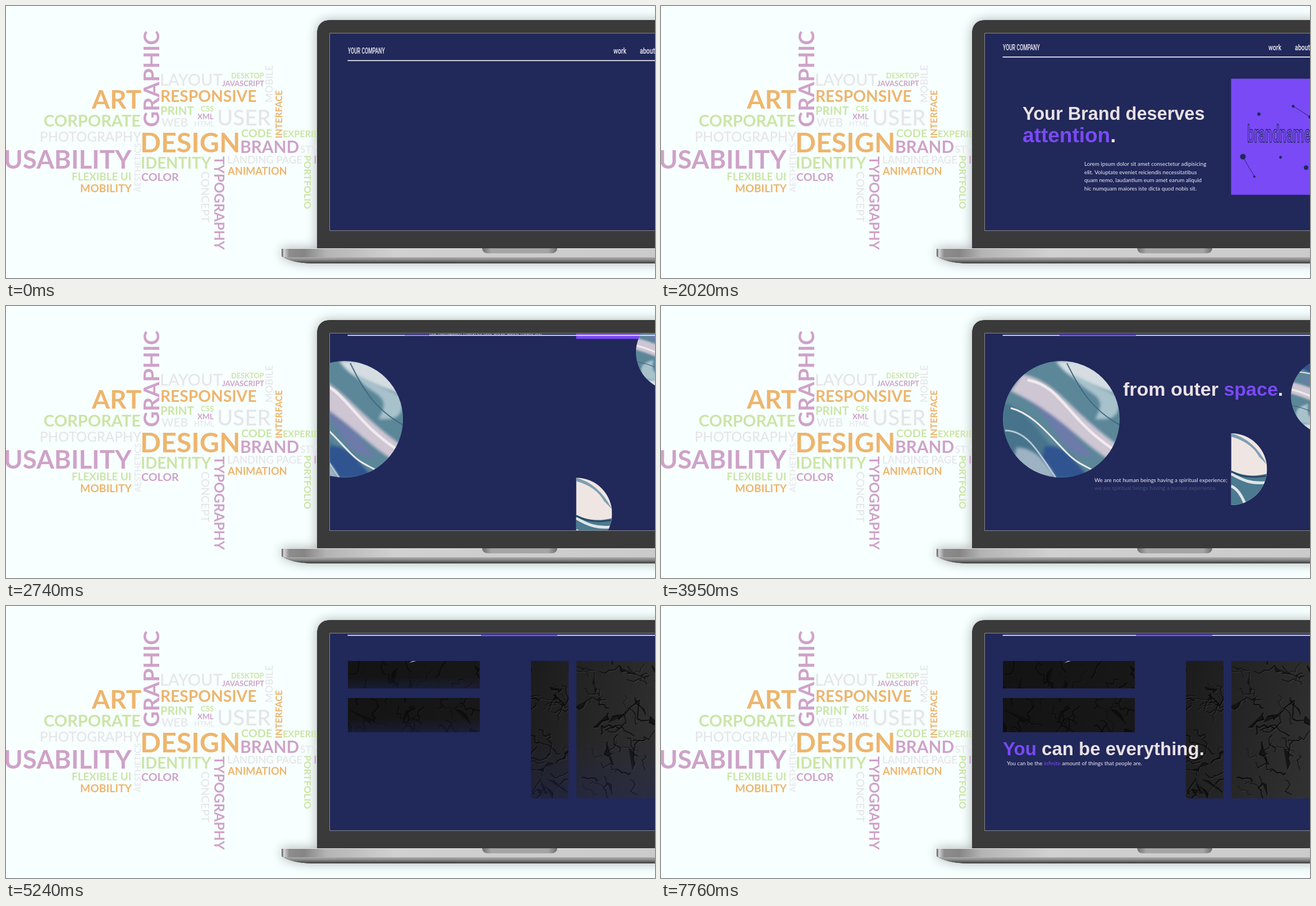
Recreate the animation shown at these times as an HTML page with a canvas. Size 1156 px wide and 485 px high, loop 8000 ms.

```html
<!DOCTYPE html>
<html lang="en">
<head>
<meta charset="utf-8">
<title>Design word cloud and laptop</title>
<style>
  html, body { margin: 0; width: 100%; height: 100%; overflow: hidden; background: #f8ffff; }
  canvas { display: block; }
</style>
</head>
<body>
<canvas id="stage" width="1156" height="485"></canvas>
<script>
const NAVY = "#21285a", VIOLET = "#7a4af6", PALE = "#e9e1e5";
const HEAD = "bold 34px 'Liberation Sans', Arial, sans-serif";
const COPY = "9.8px Lato, sans-serif";
const NAV = "500 15px Roboto, sans-serif";
const stage = document.getElementById("stage").getContext("2d");

// builds a picture once, for reuse in every frame
function picture(width, height, paint) {
  const canvas = document.createElement("canvas");
  canvas.width = width;
  canvas.height = height;
  paint(canvas.getContext("2d"));
  return canvas;
}

function layer(c, { alpha = 1, x = 0, y = 0, sx = 1, sy = 1, turn = 0, clip }, paint) {
  if (alpha <= 0) return;
  c.save();
  c.globalAlpha *= alpha;
  c.translate(x, y);
  c.rotate(turn * Math.PI / 180);
  c.scale(sx, sy);
  if (clip) c.clip(new Path2D(clip));
  paint();
  c.restore();
}

function fill(c, d, style) {
  c.fillStyle = style;
  c.fill(new Path2D(d));
}

function stroke(c, d, style, width = 1) {
  c.strokeStyle = style;
  c.lineWidth = width;
  c.stroke(new Path2D(d));
}

function box(c, x, y, w, h, style) {
  c.fillStyle = style;
  c.fillRect(x, y, w, h);
}

function dot(c, x, y, r) {
  c.beginPath();
  c.arc(x, y, r, 0, 7);
  c.fill();
}

function blend(c, x0, y0, x1, y1, ...stops) {
  const g = c.createLinearGradient(x0, y0, x1, y1);
  for (const [at, color] of stops) g.addColorStop(at, color);
  return g;
}

// words between asterisks take the accent colour
function write(c, str, x, y, font, color) {
  c.font = font;
  str.split("*").forEach((run, i) => {
    c.fillStyle = i % 2 ? VIOLET : color;
    c.fillText(run, x, y);
    x += c.measureText(run).width;
  });
}

let seed = 11;
const rnd = () => (seed = seed * 16807 % 2147483647) / 2147483647;

// word, x, baseline, size, colour, rotation
const inks = { o: "#eeb56d", p: "#cfa2c8", g: "#cbe5a5", s: "#e5e5e8" };
const words = [
  ["GRAPHIC", 273, 216, 39, "p", -90], ["ART", 153, 183, 46, "o"],
  ["CORPORATE", 67, 215, 29, "g"], ["PHOTOGRAPHY", 60, 242, 24, "s"],
  ["USABILITY", -4, 290, 45.6, "p"], ["FLEXIBLE UI", 117, 311, 18.8, "g"],
  ["MOBILITY", 132, 332, 19.3, "o"], ["AESTHETICS", 240, 332, 15, "s", -90],
  ["DESIGN", 239, 261, 48.5, "o"], ["IDENTITY", 240, 290, 27.6, "g"],
  ["COLOR", 241, 312, 19.6, "p"], ["CONCEPT", 348, 295, 19.4, "s", 90],
  ["TYPOGRAPHY", 371, 268, 24.6, "p", 90], ["LAYOUT", 274, 142, 29, "s"],
  ["RESPONSIVE", 275, 171, 28.2, "o"], ["PRINT", 275, 194, 20.4, "g"],
  ["WEB", 277, 215, 20.8, "s"], ["CSS", 347, 188, 13.2, "g"],
  ["XML", 341, 202, 13.4, "p"], ["HTML", 335, 215, 12.8, "s"],
  ["USER", 376, 213, 38.4, "s"], ["DESKTOP", 401, 129, 12.8, "g"],
  ["JAVASCRIPT", 385, 142.5, 13, "p"], ["MOBILE", 475, 172, 17.8, "s", -90],
  ["INTERFACE", 492, 236, 16.2, "o", -90], ["CODE", 419, 234, 19.8, "g"],
  ["EXPERIENCE", 493, 234, 16.2, "g"], ["BRAND", 417, 262, 29.8, "p"],
  ["STYLE", 524, 262, 17, "s"], ["LANDING PAGE", 394, 281, 18.4, "s"],
  ["I", 548, 281, 18, "p"], ["ANIMATION", 395, 301, 18.2, "o"],
  ["PORTFOLIO", 531, 266, 17, "g", 90]
];

const backdrop = picture(1156, 485, c => {
  const lid = "M554 432V50Q554 25 579 25H1200V432Z";
  const base = "M491 432H1200V459H545Q508 458 491 446Z";
  box(c, 0, 0, 1156, 485, "#f8ffff");
  layer(c, {}, () => {
    c.shadowColor = "rgba(0,0,0,.3)";
    c.shadowBlur = 20;
    fill(c, lid + base, "#3a3a3a");
  });
  for (const [word, x, y, size, ink, turn] of words)
    layer(c, { x, y, turn }, () =>
      write(c, word, 0, 0, `${ink === "s" ? 500 : 700} ${size}px Lato, sans-serif`, inks[ink]));

  fill(c, lid, "#3a3a3a");
  box(c, 576, 48, 580, 353, "#85868c");
  box(c, 577, 49, 579, 351, NAVY);
  fill(c, base, blend(c, 0, 447, 0, 459, [0, "#b5b5b5"], [.5, "#858585"], [1, "#3b3b3b"]));
  fill(c, "M491 432H1156V448H493Q491 447 491 445Z", blend(c, 491, 0, 1156, 0,
    [0, "#4c4c4c"], [.006, "#d6d6d6"], [.02, "#8d8d8d"], [.06, "#858585"],
    [.12, "#b4b4b4"], [.3, "#d0d0d0"], [1, "#cbcbcb"]));
  stroke(c, "M491 432.5H1156", "#e6e6e6");
  fill(c, "M848 432H982Q981 441 971 441H859Q849 441 848 432Z", blend(c, 848, 0, 982, 0,
    [0, "#6d6d6d"], [.12, "#a5a5a5"], [.88, "#a5a5a5"], [1, "#6d6d6d"]));
});

const marble = picture(208, 208, c => {
  box(c, 0, 0, 208, 208, "#5b8799");
  c.translate(104, 104);
  c.filter = "blur(2.5px)";
  fill(c, "M-104-30C-60-20-30 40 30 104H-104Z", "#47748c");
  fill(c, "M-50-60C-10-50 0 10 60 70L20 60C-20 20-30-20-70-40Z", "#6c7ba9");
  fill(c, "M-30 50C0 40 20 70 50 104H-40Z", "#2f5490");
  fill(c, "M-80 50Q-40 50-10 104H-90Z", "#9db3c4");
  fill(c, "M-70-80C-10-70 10-20 100 45V80C40 50 0-10-90-50Z", "#cfc6d4");
  fill(c, "M-10-104C20-60 70-60 110-40V-104Z", "#d5dde2");
  fill(c, "M20-80C40-40 90-50 60 0C90 0 104 0 104-40Z", "#a8c2cc");
  c.filter = "none";
  stroke(c, "M-60-70C0-60 10 0 95 55", "#efeaee", 5);
  stroke(c, "M-90-20C-50-10-20 30 10 60S50 80 70 104", "#efeaee", 3);
  stroke(c, "M-100 20C-60 20-40 60-10 104", "#b7c8d3", 3);
  stroke(c, "M10-100C30-60 50-20 104 10", "#40677f", 2);
});

const rock = picture(548, 245, c => {
  box(c, 0, 0, 548, 245, blend(c, 0, 0, 548, 150, [0, "#131314"], [.5, "#19191a"], [1, "#303031"]));
  for (let i = 0; i < 200; i++) {
    const start = [rnd() * 548, rnd() * 245], dir = rnd() * 6.3;
    let [x, y] = start, d = `M${start}`;
    for (let j = 0; j < 5; j++) {
      const a = dir + (rnd() - .5) * 2.4, len = 3 + rnd() * 10;
      d += `L${x += Math.cos(a) * len} ${y += Math.sin(a) * len}`;
    }
    layer(c, { x: 1.3, y: 1.3, alpha: .6 }, () => stroke(c, d, x > 300 ? "#555557" : "#2c2c2d", .8));
    if (i % 4 === 0) fill(c, d, "rgba(12,12,13,.7)");
    stroke(c, d, "#0a0a0b", .8 + rnd() * 1.4);
  }
  fill(c, "M109 4L116 0H122Z", "#a9a9a9");
});
const slabs = [[608.5, 98, 235, 49], [608.5, 164, 235, 61], [935, 98, 67, 245], [1015.5, 98, 141, 245]];

const ramp = (t, a, b) => Math.min(1, Math.max(0, (t - a) / (b - a)));
const easeOut = u => 1 - (1 - u) ** 2;
const fade = (t, a, b, paint) => layer(stage, { alpha: ramp(t, a, b) }, paint);
const slideIn = (t, a, b, paint) => {
  const u = ramp(t, a, b);
  layer(stage, { alpha: u, x: -100 * (1 - easeOut(u)) }, paint);
};

function brandPage(t) {
  const c = stage;
  fade(t, 70, 190, () => {
    box(c, 1015.5, 136, 141, 207, VIOLET);
    fade(t, 340, 490, () => {
      stroke(c, "M1126 185L1156 204M1036 275L1057 310", NAVY);
      c.fillStyle = NAVY;
      dot(c, 1126, 185, 2.5);
      dot(c, 1156, 204, 3);
      dot(c, 1065, 199, 3);
      dot(c, 1036.5, 275, 5);
      dot(c, 1057, 310.5, 2);
      dot(c, 1103.5, 276, 2.5);
      dot(c, 1149, 294.5, 4);
      layer(c, { x: 1044, y: 249, sx: .52 }, () => {
        c.font = "500 43px Roboto, sans-serif";
        c.lineWidth = 1.3;
        c.strokeText("brandname", 0, 0);
      });
    });
  });
  slideIn(t, 890, 1100, () => {
    write(c, "Your Brand deserves", 644, 209, HEAD.replace(34, 32.5), PALE);
    write(c, "*attention*.", 644, 249, HEAD.replace(34, 37), PALE);
  });
  fade(t, 1570, 1690, () => [
    "Lorem ipsum dolor sit amet consectetur adipisicing",
    "elit. Voluptate eveniet reiciendis necessitatibus",
    "quam nemo, laudantium eum amet earum aliquid",
    "hic numquam maiores iste dicta quod nobis sit."
  ].forEach((line, i) => write(c, line, 754, 291.5 + 14.5 * i, COPY, "#eeeaf2")));
}

function spacePage(t, away) {
  const c = stage, disc = r => `M${-r} 0A${r} ${r} 0 0 1 ${r} 0A${r} ${r} 0 0 1 ${-r} 0Z`;
  layer(c, { x: 713 - 240 * away, y: 202, clip: disc(104) }, () => c.drawImage(marble, -104, -104));
  layer(c, { x: 1190, y: 161 - 171 * away, clip: disc(68) }, () => {
    c.rotate(2.8);
    c.drawImage(marble, -68, -68, 136, 136);
  });
  layer(c, { x: 1015.5, y: 291 + 173 * away, clip: "M0-64A64 64 0 0 1 0 64Z" }, () => {
    box(c, 0, -64, 64, 128, "#efe6e3");
    fill(c, "M0 2C20 12 40 14 64 8V64H0Z", "#4c7a90");
    fill(c, "M0-64Q40-54 64-8L50-22Q36-48 0-58Z", "#7e9fb0");
    stroke(c, "M0 8C20 20 36 26 60 24M0 30Q14 36 24 60", "#dfe5e8", 5);
    stroke(c, "M0 4Q24 18 62 12", "#294a66", 3);
  });
  slideIn(t, 2900, 3110, () => write(c, "from outer *space*.", 823, 160, HEAD, PALE));
  fade(t, 3570, 3720, () =>
    write(c, "We are not human beings having a spiritual experience;", 772, 313.5, COPY, "#eeeaf2"));
  fade(t, 3920, 4070, () =>
    write(c, "we are spiritual beings having a human experience.", 772, 328, COPY, "#eeeaf2"));
}

function rockPage(t) {
  const c = stage, edge = -1 + 2 * easeOut(ramp(t, 4740, 5660));
  if (edge > -1) for (const [x, y, w, h] of slabs) {
    c.drawImage(rock, x - 608.5, y - 98, w, h, x, y, w, h);
    box(c, x - 1, y - 1, w + 2, h + 2,
      blend(c, 0, y + h * edge, 0, y + h * (edge + 1), [0, NAVY + "00"], [1, NAVY]));
  }
  slideIn(t, 6010, 6220, () =>
    write(c, "*You* can be everything.", 609, 266, HEAD.replace(34, 33), PALE));
  fade(t, 7250, 7760, () =>
    write(c, "You can be the *infinite* amount of things that people are.", 616, 284, COPY, "#eeeaf2"));
}

function navBar(enter, leave) {
  const c = stage;
  for (const [label, x, sx] of [["YOUR COMPANY", 609, .58], ["work", 1082, .7], ["about", 1129, .7]])
    layer(c, { x, y: 85, sx }, () => write(c, label, 0, 0, NAV, "#f1edf5"));
  box(c, 608.5, 96.5, 548, 1.7, "#f1edf5");
  layer(c, { alpha: Math.min(1, enter * 1.7) }, () =>
    box(c, 710 + 136 * leave, 96, 136 * enter, 2.5, VIOLET));
}

function draw(t) {
  const scroll = 113 * ramp(t, 2005, 2290) + 171 * ramp(t, 2290, 2740) + 30 * ramp(t, 2740, 2810);
  const enter = ramp(t, 2440, 3370), leave = ramp(t, 4080, 4740);
  stage.drawImage(backdrop, 0, 0);
  layer(stage, { clip: "M577 49.5H1156V400H577Z" }, () => {
    if (t < 2810) layer(stage, { y: -scroll }, () => brandPage(t));
    if (t > 4740) rockPage(t);
    else layer(stage, { y: -310 * leave }, () => spacePage(t, 1 - easeOut(enter)));
    layer(stage, { y: -Math.min(45, scroll) }, () => navBar(enter, leave));
  });
}

const start = performance.now();
function tick() {
  draw((performance.now() - start) % 8000);
  requestAnimationFrame(tick);
}
tick();
</script>
</body>
</html>
```
